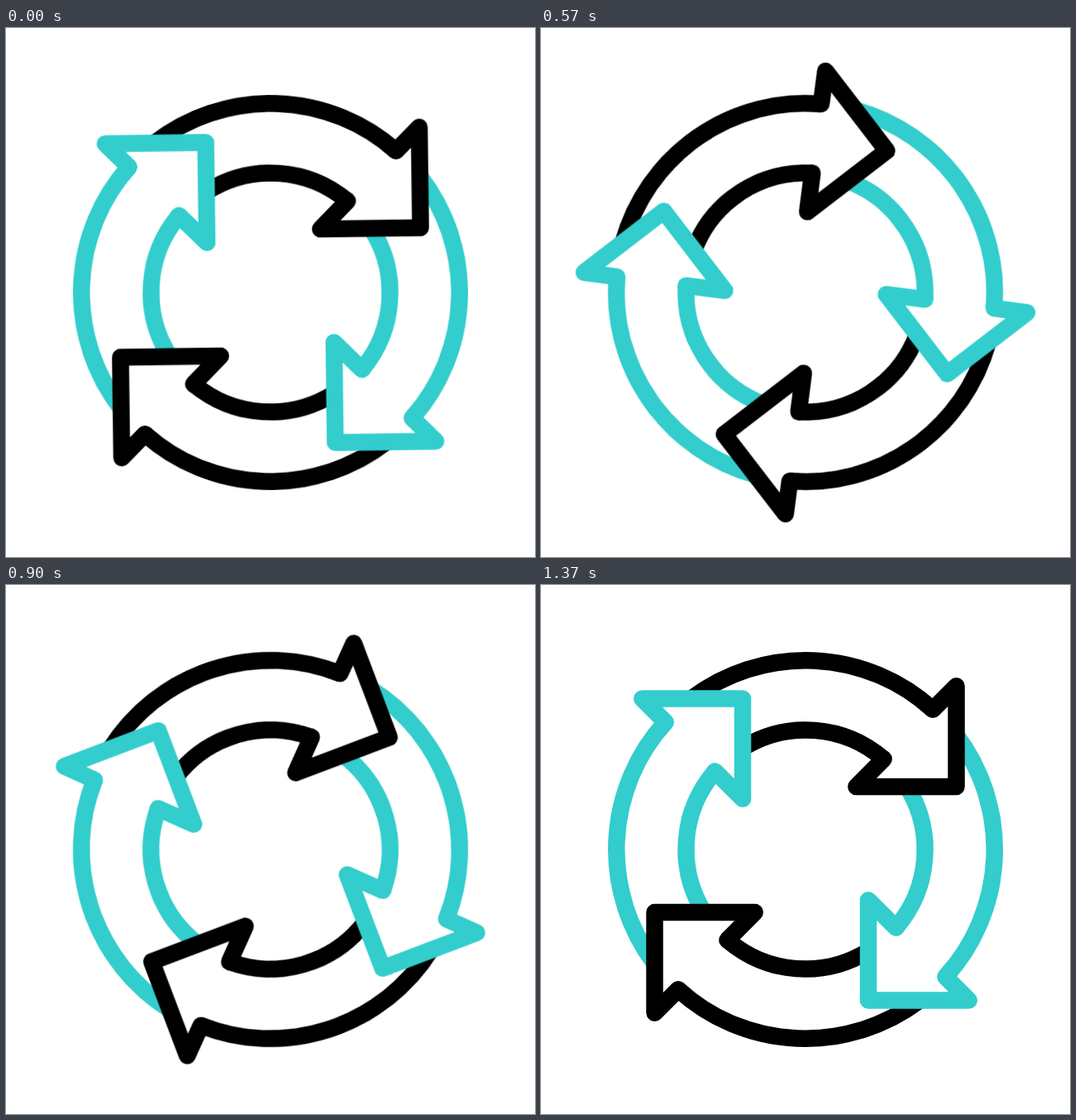
These frames come from a looping animation (640 px wide and 640 px high, 1.67 s). An HTML page:

```html
<!DOCTYPE html>
<html lang="en">
<head>
<meta charset="utf-8">
<title>Cycle arrows</title>
<style>
  html, body { margin: 0; width: 100%; height: 100%; overflow: hidden; background: #fff; }
  svg { display: block; width: 100vw; height: 100vh; }
  .line { fill: none; stroke-width: 20.5; stroke-linejoin: round; }
  .head { stroke-linecap: round; }
  .dark { stroke: #000; }
  .teal { stroke: #33cdcd; }
</style>
</head>
<body>
<svg viewBox="-320 -320 640 640">
  <defs>
    <path id="arcs" d="M-138-182.5A228.8 228.8 0 0 1 154-169.3M94.6-109.4A144.5 144.5 0 0 0-76-122.9"/>
    <path id="head" d="M154-169.3L182.5-197.8V-76H61.3L94.6-109.4"/>
  </defs>
  <g id="wheel"></g>
</svg>
<script>
  const LOOP = 1670;
  const STEPS = 41;
  const wheel = document.getElementById('wheel');

  // Arcs go below all heads, so every head covers the tail in front of it.
  for (const part of ['arcs', 'head']) {
    for (let i = 0; i < 4; i++) {
      const use = document.createElementNS('http://www.w3.org/2000/svg', 'use');
      use.setAttribute('href', '#' + part);
      use.setAttribute('class', `line ${part} ${i % 2 ? 'teal' : 'dark'}`);
      use.setAttribute('transform', `rotate(${i * 90})`);
      wheel.append(use);
    }
  }

  const bez = (t, a, b) => 3 * a * t * (1 - t) ** 2 + 3 * b * t * t * (1 - t) + t ** 3;

  // cubic-bezier(.47, 0, .53, 1), solved by bisection
  function ease(x) {
    let lo = 0, hi = 1;
    for (let i = 0; i < 30; i++) {
      const mid = (lo + hi) / 2;
      if (bez(mid, 0.47, 0.53) < x) lo = mid; else hi = mid;
    }
    return bez(lo, 0, 1);
  }

  // Wind back, then one full turn forward.
  const START = -1.25, TURN = 12.5, BACK = -55.2;
  function angle(step) {
    if (step >= STEPS) return 360;
    return step < TURN
      ? BACK * ease((step - START) / (TURN - START))
      : BACK + (360 - BACK) * ease((step - TURN) / (STEPS - TURN));
  }

  const frames = [];
  for (let k = 0; k <= STEPS; k++) {
    frames.push({
      offset: Math.round(k * 10 / 3) * 10 / LOOP,
      transform: `rotate(${angle(k).toFixed(3)}deg)`,
      easing: 'step-end'
    });
  }
  frames.push({ offset: 1, transform: 'rotate(360deg)' });
  wheel.animate(frames, { duration: LOOP, iterations: Infinity });
</script>
</body>
</html>
```
